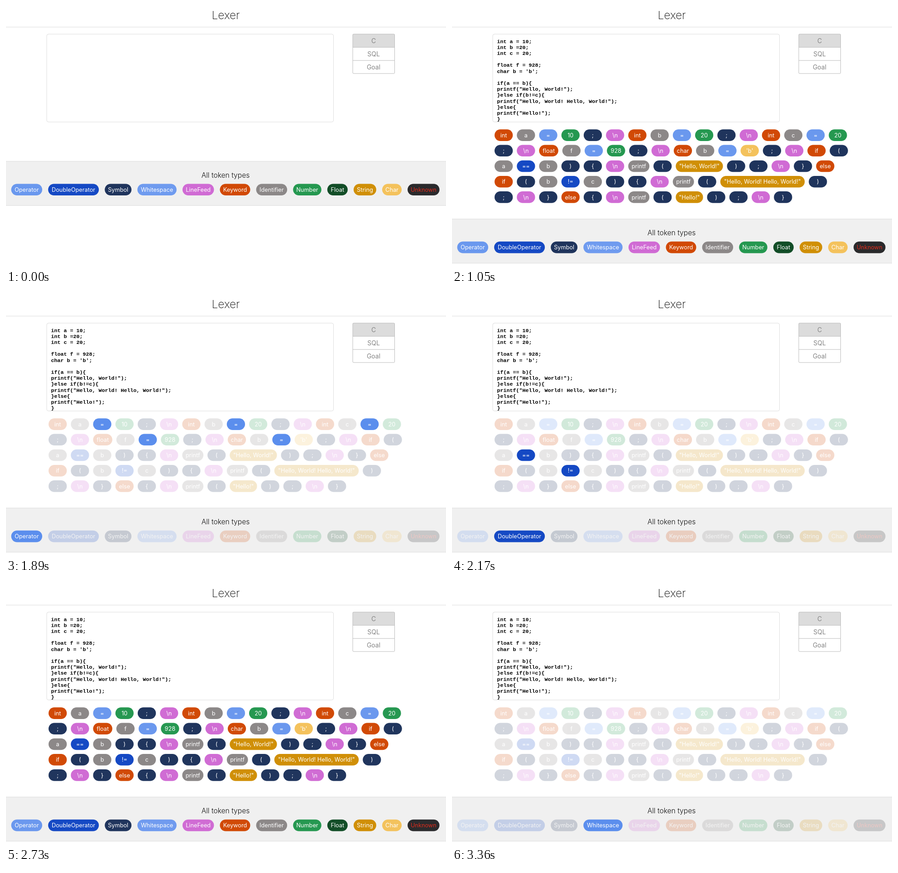
Write an HTML page that moves like this. It is 972 px wide and 576 px high and loops after 3570 ms.

```html
<!DOCTYPE html>
<html lang="en">
<head>
<meta charset="utf-8">
<title>Lexer</title>
<style>
  html, body { margin: 0; width: 100%; height: 100%; overflow: hidden; background: #fff; }
  svg { display: block; width: 972px; height: 576px; font-family: Inter, Roboto, sans-serif; }
  .pill { font-size: 12.75px; text-anchor: middle; fill: #fff; }
  .code { font: bold 11.67px "Liberation Mono", "Courier New", monospace; white-space: pre; }
  .light { text-anchor: middle; font-weight: 200; fill: #111; }
  .tab { font-size: 14px; text-anchor: middle; fill: #858585; }
</style>
</head>
<body>
<svg id="stage" viewBox="0 0 972 576">
  <text class="light" x="485.5" y="29" font-size="24.5">Lexer</text>
  <path d="M0 46.5H972" stroke="#ddd"/>
  <rect x="90" y="62" width="633.5" height="194" rx="4" fill="#fff" stroke="#ddd"/>
  <rect id="focus" x="90.5" y="62.5" width="632.5" height="193" rx="4" fill="none" stroke="#1c57a8" stroke-width="2"/>
  <g id="code" class="code"></g>
  <path id="caret" stroke="#000"/>
  <rect x="766" y="62" width="92.5" height="87" rx="2" fill="#fff"/>
  <rect x="766" y="62" width="92.5" height="29" fill="#dcdcdc"/>
  <path d="M766 91.2H858.5M766 120.2H858.5" stroke="#bbb"/>
  <rect x="766" y="62" width="92.5" height="87" rx="2" fill="none" stroke="#bbb"/>
  <text class="tab" x="812" y="81.5">C</text>
  <text class="tab" x="812" y="110.5">SQL</text>
  <text class="tab" x="812" y="139.5">Goal</text>
  <g id="tokens" class="pill"></g>
  <g id="panel">
    <rect x="-2" y="342.8" width="976" height="97.5" fill="#f0f0f0" stroke="#dcdcdc"/>
    <text class="light" x="485" y="378.5" font-size="15.6" style="font-weight:300">All token types</text>
    <g id="legend" class="pill"></g>
  </g>
</svg>
<script>
const LOOP = 3570, STEP = 70, FADE = 200, DIM = 0.2;
const FOCUS = 70, PASTE = 490, BLUR = 830;

// name: [colour, legend pill width]
const types = {
  Operator: ['#6a98ee', 68.5],
  DoubleOperator: ['#1549c4', 112],
  Symbol: ['#1f345c', 59],
  Whitespace: ['#6f9bef', 86.5],
  LineFeed: ['#d06bd4', 69.5],
  Keyword: ['#d14905', 67],
  Identifier: ['#8c8888', 68.5],
  Number: ['#259850', 62.5],
  Float: ['#124d27', 45],
  String: ['#d08f06', 50],
  Char: ['#f4c25c', 43],
  Unknown: ['#2a2a2c', 70.5]
};
const hoverFill = { Operator: '#5b8eed', Whitespace: '#5b8eed' };

// [start, hovered type]
const hovers = [
  [1670, 'Operator'], [1930, ''], [2010, 'DoubleOperator'],
  [2570, ''], [3140, 'Whitespace']
];

const source = `int a = 10;
int b =20;
int c = 20;

float f = 928;
char b = 'b';

if(a == b){
    printf("Hello, World!");
}else if(b!=c){
    printf("Hello, World! Hello, World!");
}else{
    printf("Hello!");
}`;

const $ = id => document.getElementById(id);
const pills = [];

function add(parent, tag, attrs, text) {
  const el = document.createElementNS('http://www.w3.org/2000/svg', tag);
  for (const k in attrs) el.setAttribute(k, attrs[k]);
  if (text) el.textContent = text;
  return parent.appendChild(el);
}

function pill(parent, type, label, x, y, w) {
  const g = add(parent, 'g', {});
  const rect = add(g, 'rect', { x, y, width: w, height: 25.6, rx: 12.8 });
  const text = add(g, 'text', { x: x + w / 2, y: y + 17.5 }, label);
  if (type === 'Unknown') text.setAttribute('fill', '#e02c1c');
  pills.push({ g, rect, type });
}

function classify(s) {
  if (s[0] === '\n') return 'LineFeed';
  if (s[0] === '"') return 'String';
  if (s[0] === "'") return 'Char';
  if (/^(int|float|char|if|else)$/.test(s)) return 'Keyword';
  if (/^\d/.test(s)) return 'Number';
  if (/^\w/.test(s)) return 'Identifier';
  if (s.length === 2) return 'DoubleOperator';
  return s === '=' ? 'Operator' : 'Symbol';
}

function build() {
  source.split('\n').forEach((line, i) =>
    add($('code'), 'text', { x: 99.5, y: 81.5 + i * 13.2 }, line));

  const wide = {
    float: 42.4, printf: 46.8, '"Hello!"': 60.3,
    '"Hello, World!"': 104.3, '"Hello, World! Hello, World!"': 186.5
  };
  let x = 94, y = 272.3;
  for (const s of source.match(/\n\s*|"[^"]*"|'[^']*'|[=!]=|\w+|\S/g)) {
    const w = wide[s] || 40.3, type = classify(s);
    if (x + w > 876) { x = 94; y += 34.2; }
    pill($('tokens'), type, type === 'LineFeed' ? '\\n' : s, x, y, w);
    x += w + 8.92;
  }

  x = 11.5;
  for (const name in types) {
    const w = types[name][1];
    pill($('legend'), name, name, x, 392.5, w);
    x += w + 13.1;
  }
}

function ease(x) {
  x = Math.min(1, Math.max(0, x));
  return 1 - (1 - x) ** 3;
}

function opacity(type, t) {
  let v = 1;
  hovers.forEach(([start, name], i) => {
    if (t < start) return;
    const end = i + 1 < hovers.length ? hovers[i + 1][0] : LOOP;
    const goal = !name || name === type ? 1 : DIM;
    v += (goal - v) * ease((Math.min(t, end) - start) / FADE);
  });
  return v;
}

function draw(now) {
  const t = Math.floor(now % LOOP / STEP) * STEP;
  const pasted = t >= PASTE;
  const shown = pasted ? 'visible' : 'hidden';
  $('code').setAttribute('visibility', shown);
  $('tokens').setAttribute('visibility', shown);
  $('panel').setAttribute('transform', `translate(0 ${pasted ? 127.3 : 0})`);

  $('focus').setAttribute('opacity', t < FOCUS ? 0 : 1 - ease((t - BLUR) / FADE));
  $('caret').setAttribute('d', pasted ? 'M106.5 243V255' : 'M100.5 72V84');
  $('caret').setAttribute('opacity', t >= FOCUS && t < BLUR ? 1 : 0);

  const current = hovers.filter(h => h[0] <= t).pop();
  for (const { g, rect, type } of pills) {
    const active = current && current[1] === type;
    g.setAttribute('opacity', opacity(type, t));
    rect.setAttribute('fill', active && hoverFill[type] || types[type][0]);
  }
}

build();
const begin = performance.now();
function frame() {
  draw(performance.now() - begin);
  requestAnimationFrame(frame);
}
frame();
</script>
</body>
</html>
```
